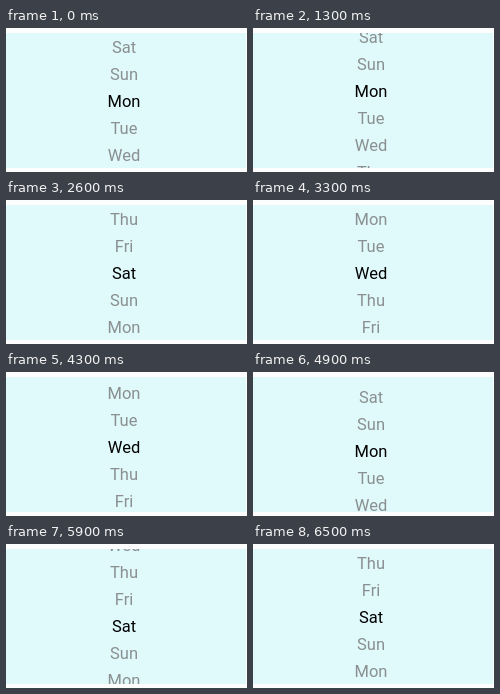
An HTML page for the animation above (6700 ms loop, 241 px wide and 144 px high).

```html
<!DOCTYPE html>
<html lang="en">
<head>
<meta charset="utf-8">
<title>Weekday wheel</title>
<style>
  html, body { margin: 0; width: 100%; height: 100%; overflow: hidden; background: #fdfdfe; }
  #wheel {
    position: absolute; left: 0; top: 5px; width: 240px; height: 135px;
    overflow: hidden; background: #e0f9fa;
  }
  .day {
    position: absolute; left: 0; top: 0; width: 236px; height: 27px;
    font: 16.5px/27px Roboto, sans-serif; text-align: center; color: #8a9091;
  }
  .day.selected { color: #000; }
</style>
</head>
<body>
<div id="wheel"></div>
<script>
const DAYS = ['Mon', 'Tue', 'Wed', 'Thu', 'Fri', 'Sat', 'Sun'];
const ROW = 27;
const LOOP = 6700;
const TICK = 100;

const easeIn = u => u * u;
const easeOut = u => 1 - (1 - u) ** 2;
const easeInOut = u => u * u * (3 - 2 * u);

// Each move adds `rows` (plus `extra` px) to the scroll between two times.
const move = (start, end, ease, rows, extra = 0) =>
  ({ start, end, ease, distance: rows * ROW + extra });

const MOVES = [
  // three quick flings up
  move(1200, 1800, easeInOut, 5),
  move(1800, 2600, easeInOut, 7),
  move(2700, 3200, easeInOut, 4),
  // two pulls down, each passing its row and settling back
  move(4000, 4500, easeIn, 0, -6),
  move(4500, 4900, easeOut, -2),
  move(4900, 5500, easeOut, 0, 6),
  move(5500, 5900, easeIn, -2, -9),
  move(5900, 6500, easeOut, 0, 9)
];

const wheel = document.getElementById('wheel');
const rows = DAYS.map(() => {
  const row = document.createElement('div');
  row.className = 'day';
  return wheel.appendChild(row);
});

const dayName = i => DAYS[(i + DAYS.length) % DAYS.length];
const clamp = u => Math.min(1, Math.max(0, u));

function scrollAt(time) {
  const sum = MOVES.reduce((total, { start, end, ease, distance }) =>
    total + distance * ease(clamp((time - start) / (end - start))), 0);
  return Math.round(sum);
}

function draw() {
  const time = performance.now() % LOOP;
  const scroll = scrollAt(Math.floor(time / TICK) * TICK);
  const middle = Math.round(scroll / ROW);
  rows.forEach((row, n) => {
    const index = middle + n - 3;
    row.textContent = dayName(index);
    row.style.top = (index + 2) * ROW + 1 - scroll + 'px';
    row.classList.toggle('selected', index === middle);
  });
  requestAnimationFrame(draw);
}
draw();
</script>
</body>
</html>
```
